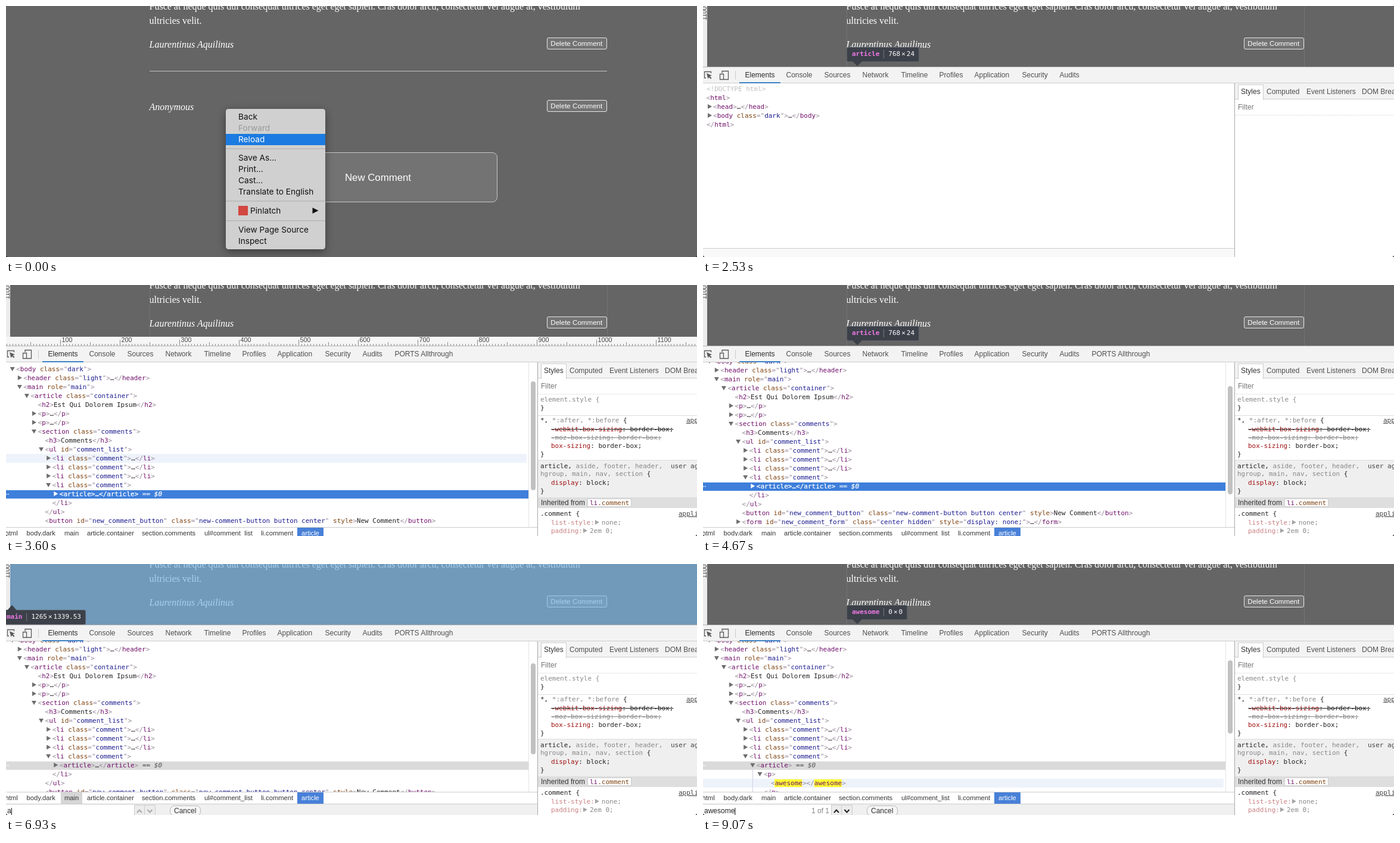
Recreate the animation shown at these times as an HTML page. Size 1160 by 422 pixels, loop 9.14 s.

```html
<!DOCTYPE html>
<html lang="en">
<head>
<meta charset="utf-8">
<title>Inspecting a page</title>
<style>
html, body { margin: 0; width: 100%; height: 100%; overflow: hidden; background: #656565; }
svg { display: block; width: 100%; height: 100%; }
text { white-space: pre; }
.ui { font: 12px "Liberation Sans", Arial, sans-serif; }
.serif { font: 16px "Liberation Serif", Times, serif; }
.it { font-style: italic; }
.menu { font: 13.7px Inter, sans-serif; }
.code { font: 11px "DejaVu Sans Mono", monospace; }
.sel tspan, .sel { fill: #fff; }
.shadow { filter: drop-shadow(0 4px 7px rgba(0,0,0,.4)); }
</style>
</head>
<body>
<svg id="stage" viewBox="0 0 1160 422"></svg>
<script>
const LOOP = 9140;
const stage = document.getElementById('stage');

const rect = (x, y, w, h, fill, more = '') =>
  `<rect x="${x}" y="${y}" width="${w}" height="${h}" fill="${fill}" ${more}/>`;
const path = (d, fill, more = '') => `<path d="${d}" fill="${fill}" ${more}/>`;
const stroke = (d, color, w = 1) => path(d, 'none', `stroke="${color}" stroke-width="${w}"`);
const text = (x, y, s, cls = 'ui', fill = '#333', more = '') =>
  `<text x="${x}" y="${y}" class="${cls}" fill="${fill}" ${more}>${s}</text>`;
const span = (fill, s, more = '') => `<tspan fill="${fill}" ${more}>${s}</tspan>`;
const steps = (t, list) => list.reduce((v, [at, next]) => (t >= at ? next : v), null);

// Page
function deleteButton(y) {
  return rect(908.5, y + .5, 100, 19, '#737373', 'rx="2.5" stroke="#e8e8e8"') +
    text(914.3, y + 14, 'Delete Comment', 'ui', '#fff', 'style="font-size:11.6px"');
}
function page() {
  return rect(0, 0, 1160, 422, '#656565') +
    text(240.5, 6, 'Fusce at neque quis dui consequat ultrices eget eget sapien. Cras dolor arcu, consectetur vel augue at, vestibulum', 'serif', '#fff') +
    text(240.5, 30, 'ultricies velit.', 'serif', '#fff') +
    text(240.5, 70, 'Laurentinus Aquilinus', 'serif it', '#fff') +
    deleteButton(53) +
    rect(241, 109, 768, 1, '#c4c4c4') +
    text(240.5, 175, 'Anonymous', 'serif it', '#fff') +
    deleteButton(158) +
    rect(425.5, 246.5, 399, 83, '#737373', 'rx="8" stroke="#c8c8c8"') +
    text(569, 294, 'New Comment', 'ui', '#fff', 'style="font-size:16.8px"');
}

// Context menu
const ITEMS = [['Back', 186], ['Forward', 205], ['Reload', 224], ['Save As...', 255], ['Print...', 274],
  ['Cast...', 293], ['Translate to English', 312], ['Pinlatch', 344], ['View Page Source', 376], ['Inspect', 395]];
function menu(active) {
  let s = rect(369, 173, 167, 236, '#d0d0d0', 'rx="4.5" class="shadow"');
  for (const y of [239, 327, 360]) s += rect(369, y, 167, 2, '#bdbdbd');
  ITEMS.forEach(([name, y], i) => {
    const on = i === active, ink = on ? '#fff' : i === 1 ? '#999' : '#111';
    if (on) s += rect(369, y - 9, 167, 19, '#1c7be0');
    if (i === 7) s += rect(390, y - 8, 16, 16, '#d2473f') + path(`M514.5 ${y - 5}v10l10-5z`, ink);
    s += text(i === 7 ? 410 : 390, y + 5, name, 'menu', ink);
  });
  return s;
}

// Element tree
const p = s => span('#98889a', s);
const name = s => span('#700f6a', s);
const attr = ([k, v]) => ' ' + span('#7f4310', k) + (v ? p('="') + span('#1c1c90', v) + p('"') : '');
const open = (n, ...a) => p('&lt;') + name(n) + a.map(attr).join('') + p('&gt;');
const close = n => p('&lt;/') + name(n) + p('&gt;');
const wrap = (n, body, ...a) => open(n, ...a) + body + close(n);
const cls = v => ['class', v];

const li = [5, 'c', wrap('li', '…', cls('comment'))];
const para = [3, 'c', wrap('p', '…')];
const HEAD = [
  [0, 'o', open('body', cls('dark'))],
  [1, 'c', wrap('header', '…', cls('light'))],
  [1, 'o', open('main', ['role', 'main'])],
  [2, 'o', open('article', cls('container'))],
  [3, '', wrap('h2', 'Est Qui Dolorem Ipsum')],
  para, para,
  [3, 'o', open('section', cls('comments'))],
  [4, '', wrap('h3', 'Comments')],
  [4, 'o', open('ul', ['id', 'comment_list'])],
  li, li, li,
  [5, 'o', open('li', cls('comment'))]
];
const SHUT = [
  [6, 'c', wrap('article', '…')],
  [5, '', close('li')],
  [4, '', close('ul')],
  [4, '', wrap('button', 'New Comment', ['id', 'new_comment_button'], cls('new-comment-button button center'), ['style'])],
  [4, 'c', wrap('form', '…', ['id', 'new_comment_form'], cls('center hidden'), ['style', 'display: none;'])]
];
const OPEN = [
  [6, 'o', open('article')],
  [7, 'o', open('p')],
  [8, '', wrap('awesome', '')],
  [7, '', close('p')]
];
const PICK = HEAD.length;

function arrow(x, y, kind, fill = '#6e6e6e') {
  return path(kind === 'o' ? `M${x} ${y - 3}h8l-4 7z` : `M${x + 1} ${y - 4}v8l7-4z`, fill);
}
// Rows running past the edges are covered by the bars painted later.
function tree(st) {
  const found = st.query.length > 2, wide = 877;
  let s = '';
  HEAD.concat(found ? OPEN : SHUT).forEach(([depth, kind, html], i) => {
    const y = 141 - st.scroll + 15 * i, x = 17.2 + 12.1 * depth;
    const picked = i === PICK, lit = picked && !st.find;
    if (picked) s += rect(0, y - 6, wide, 14, lit ? '#3e7fdb' : '#dadada');
    else if (i === st.hover) s += rect(0, y - 7, wide - 3, 15, '#eef3fb', 'rx="2"');
    if (kind) s += arrow(x - 10.5, y, kind, lit ? '#fff' : undefined);
    if (found && i === PICK + 2) {
      const w = 6.62 * st.query.length;
      s += rect(x + 6, y - 6, w, 13, '#ff3') + rect(x + 72.5, y - 6, w, 13, '#ff3');
    }
    if (picked) {
      s += rect(0, y, 1.5, 1.5, '#fff') + rect(3, y, 1.5, 1.5, '#fff');
      html += span('#444', ' == ') + span('#555', '$0', 'font-style="italic"');
    }
    s += text(x, y + 4, html, lit ? 'code sel' : 'code', '#222', lit ? 'stroke="#fff" stroke-width=".25"' : '');
  });
  if (found) s += rect(83, 346, 1, 40, '#ccd3e0');
  const [top, end] = st.thumb;
  return s + rect(wide, 130, 1, 277, '#e4e4e4') + rect(881, top, 8, end - top, '#c1c1c1', 'rx="4"');
}
function loadingTree() {
  const rows = [[6, span('#c0c0c0', '&lt;!DOCTYPE html&gt;')], [5.5, open('html')], [17, wrap('head', '…')],
    [17, wrap('body', '…', cls('dark'))], [6, close('html')]];
  return rows.map(([x, s], i) => text(x, 143 + 15 * i, s, 'code', '#222') +
    (x === 17 ? arrow(7, 139 + 15 * i, 'c') : '')).join('');
}

// Style pane
function styles(full) {
  let s = rect(893, 130, 267, 292, '#fff') + rect(893, 130, 267, 27, '#f3f3f3') + rect(893, 156, 267, 1, '#ccc') +
    rect(898.5, 132.5, 42, 25, '#fff', 'stroke="#ccc"') + rect(899, 156, 41, 2, '#fff') +
    text(903, 148, 'Styles') + text(946, 148, 'Computed', 'ui', '#4f4f4f') +
    text(1013, 148, 'Event Listeners', 'ui', '#4f4f4f') + text(1106, 148, 'DOM Breakpoints', 'ui', '#4f4f4f') +
    text(898, 174, 'Filter', 'ui', '#777') + path('M893 183.5h267', 'none', 'stroke="#ddd" stroke-dasharray="2 1"');
  if (full) {
    const line = (y, html, x = 897, fill = '#222', more = '') => text(x, y + 4, html, 'code', fill, more);
    const red = (k, v) => span('#a01010', k) + ': ' + v + ';';
    const link = 'text-decoration="underline"', cut = 'text-decoration="line-through"';
    s += rect(893, 219, 267, 1, '#ddd') + rect(893, 295, 267, 62, '#efefef') + rect(893, 294, 267, 1, '#ddd') +
      rect(893, 357, 267, 18, '#dedede') +
      line(192, 'element.style {', 897, '#888') + line(206, '}') +
      line(227, '*,' + span('#888', ' *:after, *:before') + ' {') + line(227, 'application.css', 1142, '#444', link) +
      line(242, red('-webkit-box-sizing', 'border-box'), 915, '#222', cut) +
      line(256, '-moz-box-sizing: border-box;', 915, '#888', cut) +
      line(270, red('box-sizing', 'border-box'), 915) + line(284, '}') +
      line(304, 'article,' + span('#888', ' aside, footer, header,')) + line(304, 'user agent', 1116, '#444') +
      line(317, span('#888', 'hgroup, main, nav, section') + ' {') +
      line(332, red('display', 'block'), 915) + line(346, '}') +
      text(898, 370, 'Inherited from') + rect(976.5, 359.5, 73, 13, '#fff', 'stroke="#ccc"') +
      line(366, 'li' + span('#7f4310', '.comment'), 980, '#700f6a') +
      line(384, '.comment {') + line(384, 'application.css', 1129, '#444', link);
    [['list-style:', 'none;', 399], ['padding:', '2em 0;', 413]].forEach(([k, v, y]) => {
      const x = 915 + k.length * 6.62;
      s += line(y, k, 915, '#c98080') + path(`M${x + 1} ${y - 4}v8l7-4z`, '#a5a5a5') + line(y, v, x + 12, '#888');
    });
  }
  return s + rect(892, 130, 1, 292, '#a8a8a8');
}

// Panel chrome
const TABS = [['Elements', 70.5], ['Console', 139.5], ['Sources', 203.5], ['Network', 267.5], ['Timeline', 332.5],
  ['Profiles', 396.5], ['Application', 455.5], ['Security', 535.5], ['Audits', 598.5], ['PORTS Allthrough', 652.5]];
function toolbar(full) {
  return rect(0, 102, 1160, 28, '#f3f3f3') + rect(0, 102, 1160, 1, '#b5b5b5') + rect(0, 129, 1160, 1, '#ccc') +
    stroke('M5 121H2.5V110.5H13.5V113', '#5a5a5a', 1.3) + path('M6 113l9 4-3.5 1.3 3 3-1.5 1.5-3-3-1.5 3z', '#5a5a5a') +
    stroke('M32 113V109.5H42.5V123.5H35M28.5 114.5h6v9h-6z', '#5a5a5a', 1.3) +
    rect(54, 109, 1, 15, '#ccc') +
    TABS.slice(0, full ? 10 : 9).map(([s, x], i) => text(x, 120, s, 'ui', i ? '#4f4f4f' : '#2b2b2b')).join('') +
    rect(61, 128, 69, 2, '#3e82c4');
}
const CRUMBS = [['html', -1.5], ['body.dark', 34.5], ['main', 98], ['article.container', 136], ['section.comments', 228],
  ['ul#comment_list', 333], ['li.comment', 428], ['article', 496]];
function crumbs(y, hot) {
  return rect(0, y - 1, 892, 21, '#fff') + rect(0, y - 1, 892, 1, '#ccc') +
    (hot ? rect(92, y, 36, 19, '#d6d6d6') : '') + rect(489, y, 44, 19, '#4880d8') +
    CRUMBS.map(([s, x], i) => text(x, y + 13, s, 'ui', i === 7 ? '#fff' : '#333', 'style="font-size:11.2px"')).join('');
}
function findBar(query) {
  const hit = query.length > 2, ink = hit ? '#222' : '#aaa';
  return rect(0, 403, 892, 19, '#f0f0f0') + rect(0, 403, 892, 1, '#ccc') + rect(0, 405, 250, 17, '#fff') +
    (query ? text(2, 419, query + span('#000', '|', 'dx="-1"'), 'ui', '#222')
           : text(2, 419, 'Find by string, selector, or XPath', 'ui', '#777')) +
    (hit ? text(182, 419, '1 of 1', 'ui', '#888') : '') +
    rect(215.5, 405.5, 35, 18, '#ececec', 'stroke="#ccc"') + rect(232, 406, 1, 16, '#ccc') +
    stroke('M220 418l4-4.5 4 4.5', ink, 2) + stroke('M237.5 413l4 4.5 4-4.5', ink, 2) +
    rect(275.5, 406.5, 51, 17, '#f6f6f6', 'rx="7" stroke="#b5b5b5"') + text(282, 419, 'Cancel');
}

// Page overlays
const TIPS = {
  article: [['article'], '768', '24'],
  awesome: [['awesome'], '0', '0'],
  main: [['main'], '1265', '1339.53'],
  button: [['button', '#new_comment_button', '.new-comment-button.button.center'], '400', '84']
};
function tip(key) {
  const [label, w, h] = TIPS[key], up = key === 'main', x = up ? -8 : 241, y = up ? 77 : 69;
  const end = x + 9 + 6.62 * label.join('').length;
  const right = end + 15 + 6.62 * (w.length + h.length + 1) + 4 + 8;
  const ink = ['#ee78e6', '#ffab66', '#8ccaf2'], c = x + 18;
  return rect(x + .5, y + .5, right - x - 1, 24, '#3c4049', 'rx="2" stroke="#5d6168"') +
    path(up ? `M${c - 8} ${y + 1}l8-9 8 9z` : `M${c - 8} ${y + 24}l8 8 8-8z`, '#3c4049') +
    text(x + 9, y + 15, label.map((s, i) => span(ink[i], s, i ? '' : 'font-weight="bold"')).join(''), 'code') +
    rect(end + 6.5, y + 5, 1, 14, '#777b83') +
    text(end + 15, y + 15, w + '<tspan dx="2">×</tspan><tspan dx="2">' + h + '</tspan>', 'code', '#fff');
}
function ruler() {
  let d = '', s = rect(0, 87, 1160, 15, '#f6f6f6');
  for (let v = 10; v < 1170; v += 5) {
    d += `M${v - 8.5} 102v${v % 100 ? (v % 50 ? -3 : -6) : -10}`;
    if (v % 100 === 0) s += text(v - 6.5, 96, v, 'ui', '#444', 'style="font-size:10.8px"');
  }
  return s + stroke(d, '#8a8a8a');
}
function overlay(st) {
  const guides = st.tip === 'main' ? [] : st.tip === 'button' ? [241, 426, 458, 792, 825, 1009] : [241, 1009];
  let s = st.tip === 'main' ? rect(7, 0, 1153, 102, '#77b5e9', 'opacity=".65"') : '';
  s += guides.map(x => rect(x, 0, 1, 102, '#737373')).join('') + rect(0, 0, 7, 102, '#ececec') +
    text(0, 0, '1100', 'ui', '#444', 'transform="translate(6 24) rotate(-90)" style="font-size:10.8px"');
  return s + (st.tip === 'ruler' ? ruler() : tip(st.tip));
}

function stateAt(t) {
  const find = t >= 5500;
  const query = 'awesome'.slice(0, steps(t, [[0, 0], [6750, 1], [6950, 2], [7200, 3], [7400, 4], [7600, 5], [7800, 6], [8060, 7]]));
  const scroll = Math.round(13 * Math.min(1, Math.max(0, (t - 3760) / 140)));
  const thumb = query.length > 2 ? [162, 285] : find ? [167, 320] : [162 + scroll * 8 / 13, 345 + scroll * 7 / 13];
  return {
    find, query, scroll, thumb,
    tip: steps(t, [[0, 'article'], [3100, 'ruler'], [3950, 'article'], [6150, 'button'], [6550, 'main'], [8520, 'awesome']]),
    hover: steps(t, [[0, -1], [3100, 12], [3260, 11], [3400, 10], [3800, 12], [3950, -1], [6150, 17], [6260, 16], [6450, -1], [8480, 16]])
  };
}

function scene(t) {
  let s = page();
  if (t < 2000) {
    s += menu(steps(t, [[0, 2], [480, 3], [570, 4], [650, 5], [740, 6], [870, 7], [1070, 8], [1200, 9]]));
  } else if (t >= 2070) {
    s += rect(0, 102, 1160, 320, '#fff');
    if (t >= 2270) {
      const st = stateAt(t), full = t >= 2730;
      s += full ? tree(st) : loadingTree();
      s += toolbar(full) + overlay(st) + styles(full);
      if (!full) s += rect(0, 407, 892, 15, '#f9f9f9') + rect(0, 407, 892, 1, '#ccc');
      else s += crumbs(st.find ? 384 : 408, st.tip === 'main') + (st.find ? findBar(st.query) : '');
    }
  }
  return s + path('M0 418q0 4 4 4h-4zM1160 418q0 4-4 4h4z', '#222');
}

let last = '';
function frame(now) {
  const s = scene(now % LOOP);
  if (s !== last) stage.innerHTML = last = s;
  requestAnimationFrame(frame);
}
frame(performance.now());
</script>
</body>
</html>
```
